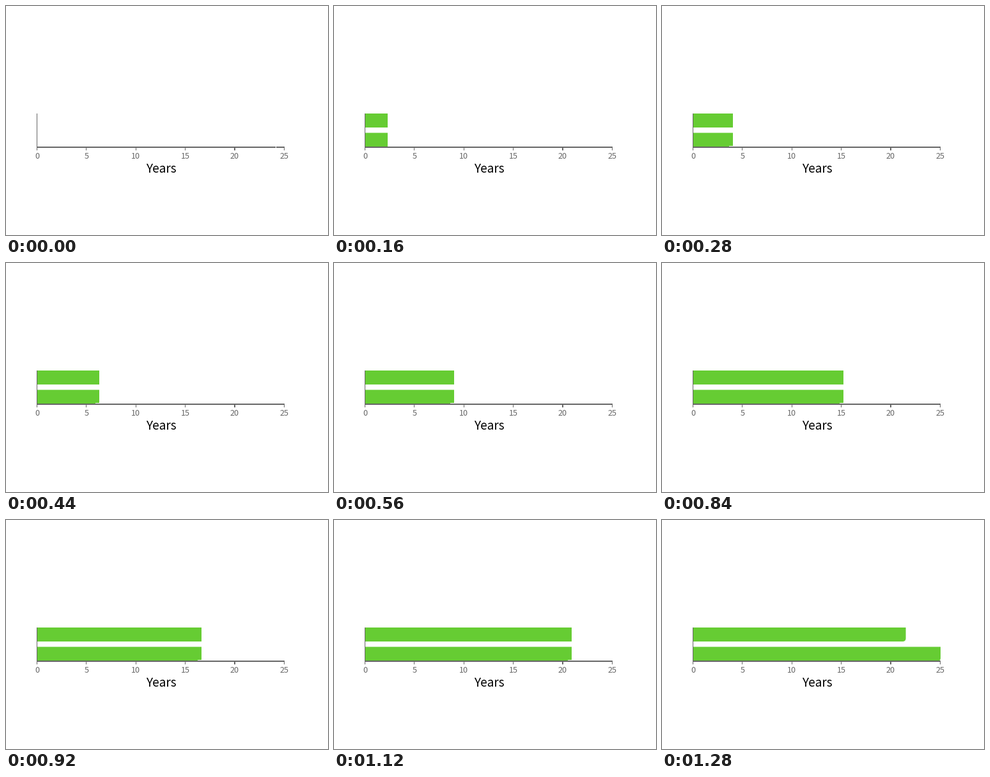
These frames come from a looping animation (504 px wide and 360 px high, 1.32 s). A matplotlib script:

```python
import numpy as np
import matplotlib.pyplot as plt
from matplotlib.animation import FuncAnimation
from matplotlib.patches import PathPatch, Rectangle
from matplotlib.path import Path

W, H = 504, 360
FRAMES, INTERVAL = 33, 40
GREEN, GREY = "#66cc33", "#666666"
FONT = "Noto Sans CJK JP"
X0, X1, BASE = 48, 435.4, 222

# Reveal edge of the bars: key frames and pixel positions
KEY_FRAMES = [0, 4, 11, 14, 18, 23, 28, 32]
KEY_EDGES = [48, 84, 146, 188, 250, 306, 372, 436]

fig = plt.figure(figsize=(W / 72, H / 72), dpi=72, facecolor="white")
ax = fig.add_axes([0, 0, 1, 1])
ax.set_xlim(0, W)
ax.set_ylim(H, 0)
ax.axis("off")


def rect(left, top, right, bottom, color, z):
    box = Rectangle((left, top), right - left, bottom - top,
                    facecolor=color, linewidth=0, zorder=z)
    return ax.add_patch(box)


def bar(top, right, bottom, r=5):
    """Bar whose lower right corner is rounded."""
    points = [(X0, top), (right, top), (right, bottom - r),
              (right, bottom), (right - r, bottom), (X0, bottom), (X0, top)]
    codes = [Path.MOVETO, Path.LINETO, Path.LINETO,
             Path.CURVE3, Path.CURVE3, Path.LINETO, Path.CLOSEPOLY]
    shape = PathPatch(Path(points, codes), facecolor=GREEN, linewidth=0, zorder=1)
    return ax.add_patch(shape)


def label(x, baseline, text, size, color):
    ax.text(x, baseline, text, size=size, color=color, family=FONT,
            ha="center", va="baseline", zorder=4)


bars = [bar(169, 381.6, 191), bar(199.4, 436, 222)]
notch = rect(0, 220, 6.5, 221.3, "white", 2)

# Axis with ticks and labels
rect(X0, 169, X0 + 1, BASE, GREY, 3)
rect(X0, BASE - 0.8, 436, BASE + 0.8, GREY, 3)
for years in range(0, 26, 5):
    x = X0 + 0.4 + (X1 - X0 - 0.4) * years / 25
    rect(x - 0.6, BASE, x + 0.6, 227, GREY, 3)
    label(x, 239.5, str(years), 12.6, GREY)
label(243.3, 262, "Years", 19, "black")
gap = rect(422, BASE - 1, 423, BASE + 1, "white", 4)


def update(n):
    edge = round(float(np.interp(n, KEY_FRAMES, KEY_EDGES)))
    window = Rectangle((0, 0), edge, H, transform=ax.transData)
    for shape in bars:
        shape.set_visible(n > 0)
        shape.set_clip_path(window)
    notch.set_x(edge - 6.5)
    notch.set_visible(4 < n < FRAMES - 1)
    gap.set_visible(n == 0)
    return [*bars, notch, gap]


anim = FuncAnimation(fig, update, frames=FRAMES, interval=INTERVAL,
                     repeat=True, repeat_delay=0)
plt.show()
```
